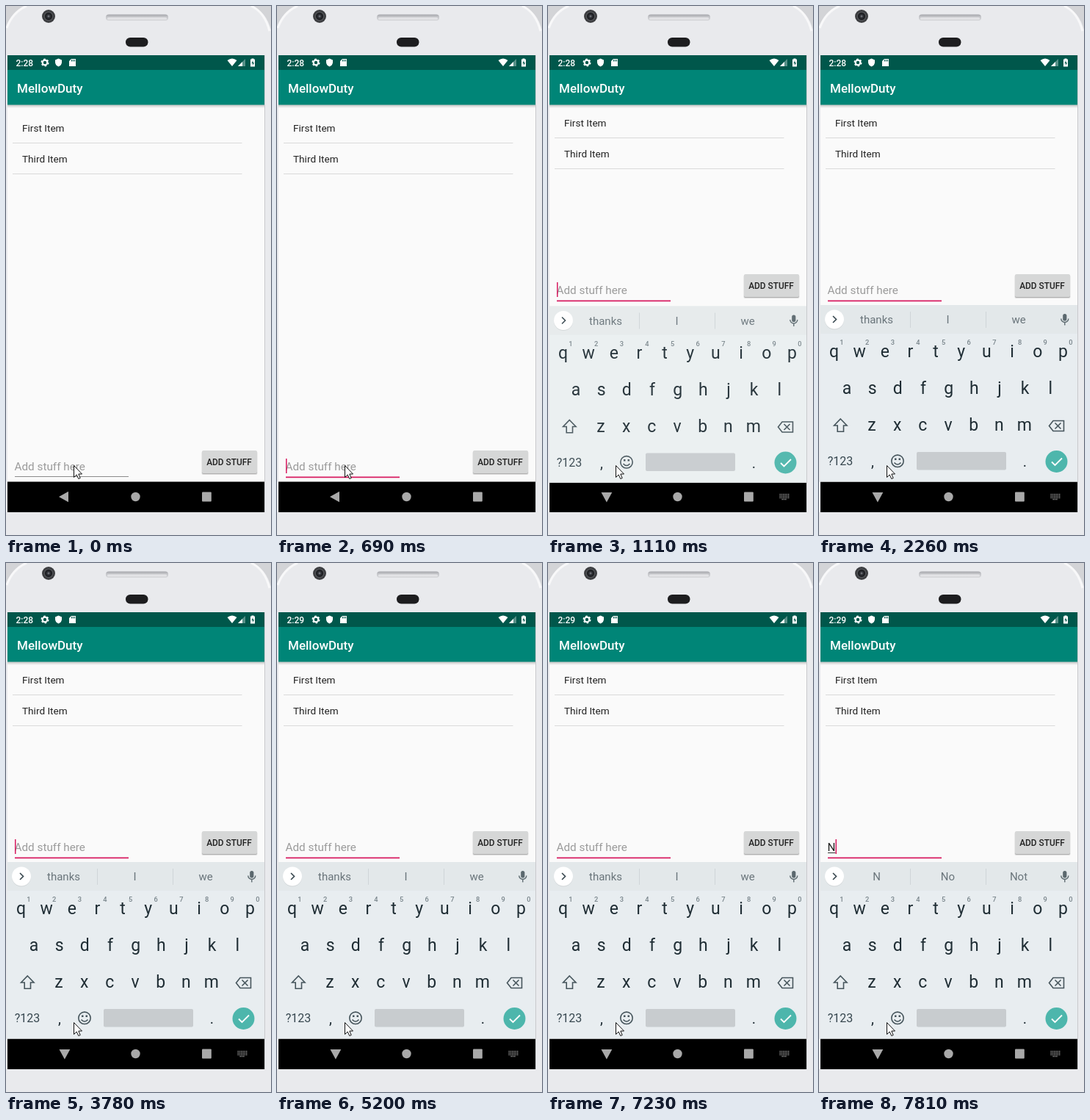
An HTML page that plays this animation: 361 px wide and 720 px high, repeating every 8000 ms.

```html
<!DOCTYPE html>
<html lang="en">
<head>
<meta charset="utf-8">
<title>Todo list on a phone</title>
<style>
html, body { margin: 0; width: 100%; height: 100%; overflow: hidden; background: #e9eaed; }
svg { display: block; width: 100%; height: 100%; font-family: Roboto, "Noto Sans", sans-serif; }
.mid { text-anchor: middle; }
.med { font-weight: 500; }
</style>
</head>
<body>
<svg viewBox="0 0 361 720">
  <defs>
    <linearGradient id="shade" x2="0" y2="1">
      <stop offset="0" stop-color="#000" stop-opacity=".24"/>
      <stop offset="1" stop-color="#000" stop-opacity="0"/>
    </linearGradient>
    <linearGradient id="slot" x2="0" y2="1">
      <stop offset="0" stop-color="#a5a6ab"/>
      <stop offset=".4" stop-color="#c5c6ca"/>
      <stop offset="1" stop-color="#d8d9dc"/>
    </linearGradient>
    <radialGradient id="lens">
      <stop offset="0" stop-color="#8b8d93"/>
      <stop offset=".22" stop-color="#303238"/>
      <stop offset=".5" stop-color="#191a1d"/>
      <stop offset=".62" stop-color="#55575b"/>
      <stop offset=".8" stop-color="#38393c"/>
      <stop offset="1" stop-color="#47484b"/>
    </radialGradient>
  </defs>

  <!-- phone body -->
  <path fill="#e9eaed" d="M0 0H361V720H0z"/>
  <path fill="#d3d4d7" d="M0 0H26Q8 8 0 28zM336 0H361V32Q354 8 336 0z"/>
  <path fill="none" stroke="#f8f8f9" stroke-width="3" d="M28 0Q9 8 1 30M334 0Q352 8 359 34"/>
  <circle cx="58" cy="14" r="9" fill="url(#lens)"/>
  <rect x="136" y="11.5" width="85" height="8.5" rx="4" fill="url(#slot)"/>
  <rect x="138" y="15.5" width="81" height="3" rx="1.5" fill="#e3e3e6"/>
  <rect x="163" y="43" width="30.5" height="12.5" rx="6.2" fill="#1d1d1f"/>
  <path fill="#c9cacd" d="M352 67h1V689h-1z"/>

  <!-- app -->
  <path fill="#fafafa" d="M2 134H352V649H2z"/>
  <path fill="url(#shade)" d="M2 134H352V139H2z"/>
  <path fill="#00574b" d="M2 67H352V87H2z"/>
  <path fill="#008577" d="M2 87H352V134.500H2z"/>
  <text id="clock" class="med" x="13.500" y="81.500" font-size="12" fill="#fff"></text>
  <g fill="#fff">
    <circle cx="53" cy="77" r="3.300" fill="none" stroke="#fff" stroke-width="2.200"/>
    <circle cx="53" cy="77" r="4.700" fill="none" stroke="#fff" stroke-width="1.600" stroke-dasharray="2.460"/>
    <path d="M71.500 71.500L76 73.500V77Q75.500 81 71.500 82.500Q67.500 81 67 77V73.500z"/>
    <path d="M89 72H95V82H86V75z"/>
    <path stroke="#00574b" d="M89.500 73v2.500M91.500 73v2.500M93.500 73v2.500"/>
    <path d="M301.500 74Q308 69 314.500 74L308 82z"/>
    <path opacity=".35" d="M326 72V82H316z"/>
    <path d="M322 76V82H316z"/>
    <path d="M334.500 71.500h3v1h1.500v10h-6v-10h1.500z"/>
    <path fill="#00574b" d="M336.500 74l-2 4h1.500v3l2-4h-1.500z"/>
  </g>
  <text class="med" x="15" y="117.500" font-size="17" fill="#fff">MellowDuty</text>
  <g id="list" font-size="13.600" fill="#222">
    <text x="22" y="171">First Item</text>
    <text x="22" y="213">Third Item</text>
    <path fill="#dadada" d="M9 186H321.500v1H9zM9 228H321.500v1H9z"/>
  </g>

  <!-- entry row, placed for the open keyboard -->
  <g id="entry">
    <text id="hint" x="11.500" y="392" font-size="15.300" fill="#9b9b9b">Add stuff here</text>
    <g id="typed">
      <text x="11.500" y="392" font-size="15.300" fill="#222">N</text>
      <path fill="#333" d="M12 394h10.500v1H12z"/>
    </g>
    <path id="line"/>
    <rect id="caret" y="376" width="1.500" height="20" fill="#d81b60"/>
    <rect x="266.500" y="366" width="76" height="32" rx="2" fill="#000" opacity=".12"/>
    <rect x="267" y="366" width="75" height="31" rx="2" fill="#000" opacity=".2"/>
    <rect x="267" y="365" width="75" height="31" rx="2" fill="#d6d7d7"/>
    <text class="mid med" x="304" y="385.200" font-size="11.900" fill="#222">ADD STUFF</text>
  </g>

  <!-- navigation -->
  <path fill="#000" d="M2 647.500H352V689H2z"/>
  <g fill="#a9a9a9">
    <path id="back"/>
    <circle cx="176.500" cy="668" r="6.200"/>
    <rect x="267" y="661.500" width="12.800" height="13" rx="1"/>
    <path id="ime" fill="none" stroke="#a0a0a0" stroke-width="1.300" stroke-dasharray="1.400 .9"
      d="M315.500 664.700H328.500M315.500 667H328.500M315.500 669.300H328.500M318.500 671.500h7"/>
  </g>

  <!-- keyboard -->
  <g id="board">
    <path id="plate" d="M2 407H352V647.500H2z"/>
    <path id="strip" d="M2 407H352V446H2z"/>
    <circle cx="21" cy="427.500" r="13" fill="#000" opacity=".08"/>
    <circle cx="21" cy="426.500" r="13" fill="#fff"/>
    <path fill="none" stroke="#37474f" stroke-width="1.600" d="M19 422l4.500 4.500L19 431"/>
    <path fill="#cfd5d8" d="M124 416h1v22h-1zM227 416h1v22h-1z"/>
    <g id="words" class="mid" font-size="15" fill="#6a757b"></g>
    <g fill="#5b686e">
      <rect x="332.200" y="419" width="5.200" height="9.500" rx="2.600"/>
      <path fill="none" stroke="#5b686e" stroke-width="1.400" d="M329.800 425.500a5 5 0 0 0 10 0M334.800 430.500v4"/>
    </g>
    <g id="keys" class="mid" font-size="23" fill="#1f2d34"></g>
    <g id="marks" class="mid med" font-size="9.300" fill="#78848a"></g>
    <g fill="none" stroke="#46555c" stroke-width="1.600">
      <path id="shift" d="M29.300 562L38 571H33.500V579.300H25.200V571H20.600z"/>
      <path d="M319 564.500H333.500V578.500H319L313.500 571.500zM321.500 567.500l8 8M329.500 567.500l-8 8"/>
      <circle cx="107" cy="619.300" r="8.200"/>
      <path d="M102.500 621.500q4.500 5 9 0"/>
    </g>
    <path fill="#46555c" d="M103 615.500h2.500v2.500H103zM108.500 615.500h2.500v2.500h-2.500z"/>
    <text class="mid" x="29" y="625" font-size="16" fill="#37474f">?123</text>
    <text class="mid" x="73" y="627" font-size="20" fill="#1f2d34">,</text>
    <text class="mid" x="280.500" y="627" font-size="20" fill="#1f2d34">.</text>
    <rect x="133" y="607" width="122" height="24.500" rx="2" fill="#c8cccf"/>
    <circle cx="323.500" cy="620" r="15" fill="#4db6ac"/>
    <path fill="none" stroke="#fff" stroke-width="1.800" d="M317 620.500l4.500 4.500L331 615.500"/>
  </g>

  <path fill="#fff" stroke="#111" stroke-width="1" d="M92.500 625.500V641.500L96.200 638L98.800 643.500L101.200 642.500L98.800 637H103.500z"/>
</svg>
<script>
const LOOP = 8000;
const FOCUS = 690, RESIZE = 830, SLIDE = 1110, SETTLE = 1260, MINUTE = 5050, CAPS = 7690, TYPED = 7810;
const BLINKS = [1260, 1820, 2260, 2820, 3220, 3780, 4210, 4740, 5200, 5760, 6200, 6790, 7230, 7690];
const ROWS = [["qwertyuiop", 20.5, 478], ["asdfghjkl", 38, 528], ["zxcvbnm", 72, 578]];
const PITCH = 34.65;

const $ = id => document.getElementById(id);
const set = (id, attrs) => { for (const k in attrs) $(id).setAttribute(k, attrs[k]); };
const show = (id, on) => set(id, { visibility: on ? "visible" : "hidden" });

function label(parent, x, y, text) {
  const el = document.createElementNS("http://www.w3.org/2000/svg", "text");
  el.setAttribute("x", x);
  el.setAttribute("y", y);
  el.textContent = text;
  $(parent).append(el);
  return el;
}

const keys = ROWS.flatMap(([chars, x, y]) =>
  [...chars].map((c, i) => ({ c, el: label("keys", x + i * PITCH, y, c) })));
[..."1234567890"].forEach((c, i) => label("marks", 31 + i * PITCH, 461, c));
const words = [78.5, 175.5, 272].map(x => label("words", x, 432, ""));

function draw(t) {
  const focused = t >= FOCUS, open = t >= RESIZE, done = t >= TYPED;
  const sliding = t >= SLIDE && t < SETTLE;
  const caps = t >= CAPS && !done;
  const flips = BLINKS.filter(b => b <= t).length;

  $("clock").textContent = t < MINUTE ? "2:28" : "2:29";
  set("list", { transform: `translate(0 ${open ? -7 : 0})` });
  set("entry", { transform: `translate(0 ${open ? 0 : 240})` });
  set("line", focused
    ? { d: "M12 400.500H167v1.700H12z", fill: "#d81b60" }
    : { d: "M12 400H167v1H12z", fill: "#8b8b8b" });
  show("hint", !done);
  show("typed", done);
  show("caret", focused && flips % 2 === 0);
  set("caret", { x: done ? 22.5 : 12 });

  set("back", { d: open ? "M72.500 662H87.300L79.900 675.500z" : "M72 668L85 660.800V675.200z" });
  show("ime", open);

  show("board", t >= SLIDE);
  set("board", { transform: `translate(0 ${sliding ? 1.5 : 0})`, opacity: sliding ? 0.95 : 1 });
  set("plate", { fill: sliding ? "#ebf0f1" : "#e8edf0" });
  set("strip", { fill: sliding ? "#e6ebec" : "#e3e8ea" });
  set("shift", { fill: caps ? "#46555c" : "none" });
  for (const { c, el } of keys) el.textContent = caps ? c.toUpperCase() : c;
  const picks = done ? ["N", "No", "Not"] : ["thanks", "I", "we"];
  words.forEach((el, i) => el.textContent = picks[i]);
}

const start = performance.now();
function tick() {
  draw((performance.now() - start) % LOOP);
  requestAnimationFrame(tick);
}
tick();
</script>
</body>
</html>
```
